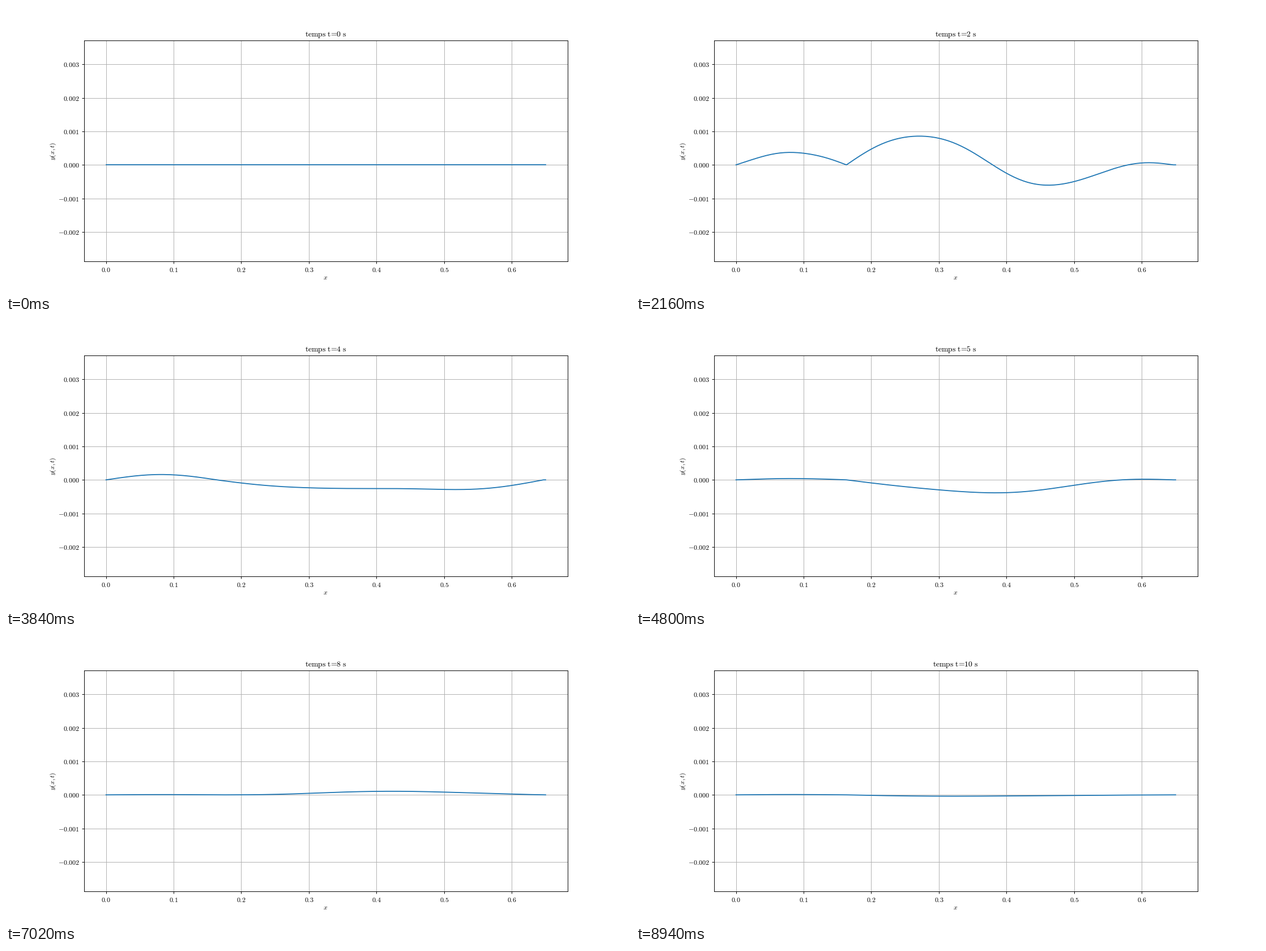
A matplotlib script that plays this animation: 1102x508 px, repeating every 9 s.

```python
import numpy as np
import matplotlib.pyplot as plt
from matplotlib.animation import FuncAnimation

W, H, DPI = 1102, 508, 64
PX = 72 / DPI  # points per pixel
FRAMES, INTERVAL = 150, 60
LENGTH, PLUCK_X, PLUCK_H = 0.65, 0.55, 0.00371
RELEASE, T0 = 15, 23  # letting go, and the moment mode amplitudes refer to

plt.rcParams.update({
    "mathtext.fontset": "cm",
    "font.size": 11.9 * PX,
    "axes.titlesize": 13.75 * PX,
    "axes.titlepad": 7.2 * PX,
    "axes.linewidth": 0.96 * PX,
    "grid.linewidth": 0.96 * PX,
    "grid.color": "#b0b0b0",
    "lines.linewidth": 1.8 * PX,
})
for axis in ("xtick", "ytick"):
    plt.rcParams.update({
        f"{axis}.major.size": 4.2 * PX,
        f"{axis}.major.pad": 4.2 * PX,
        f"{axis}.major.width": 0.96 * PX,
    })

x = np.linspace(0, LENGTH, 200)
NODE, END = 50, 198
left = x[:NODE + 1] / x[NODE]
right = (x[NODE:END + 1] - x[NODE]) / (x[END] - x[NODE])

# mode number, amplitude, phase in turns
RIGHT_MODES = [
    (1, -2.09e-3, -0.02),
    (2, -0.95e-3, -0.08),
    (3, 0.57e-3, 0.15),
    (4, -0.20e-3, 0.0),
    (5, -0.04e-3, 0.0),
    (6, -0.02e-3, 0.0),
    (7, 0.04e-3, 0.0),
]


def turn(v):
    return np.cos(2 * np.pi * v)


def mode(n, s):
    return np.sin(n * np.pi * s)


def pulled(k):
    """Triangle drawn up steadily until the release."""
    return PLUCK_H * k / RELEASE * np.interp(x, [0, PLUCK_X, LENGTH], [0, 1, 0])


def ringing(k):
    """Damped modes on both sides of the touched node."""
    d = k - T0
    y = np.zeros_like(x)
    for n, amp, phase in RIGHT_MODES:
        decay = np.exp(-(0.0325 + 0.0006 * (n * n - 1)) * d)
        y[NODE:END + 1] += amp * decay * turn(0.175 * n * d + phase) * mode(n, right)
    base = 0.66e-3 * np.exp(-0.033 * d) * turn(0.0705 * (k - 49))
    ripple = -0.02e-3 * np.exp(-0.06 * d) * turn(0.141 * d)
    y[:NODE + 1] += base * mode(1, left) + ripple * (mode(2, left) + mode(4, left))
    y[[0, NODE, END, -1]] = 0
    return y


def title(k):
    seconds = round(k / 15)
    return (r"$\mathrm{temps\ t}\hspace{-0.2}=\hspace{-0.2}"
            rf"\mathrm{{{seconds}\ s}}$")


fig = plt.figure(figsize=(W / DPI, H / DPI), dpi=DPI, facecolor="white")
ax = fig.add_axes([0.125, 0.11, 0.775, 0.77])
ax.set_xlim(-0.0325, 0.6825)
ax.set_ylim(-0.002882, 0.003714)
xt = np.arange(7) / 10
yt = np.arange(-2, 4) / 1000
ax.set_xticks(xt, [f"${v:.1f}$" for v in xt])
ax.set_yticks(yt, [f"${v:.3f}$" for v in yt])
ax.grid(True)
fig.text(564.5 / W, 1 - 481 / H, "$x$", ha="center", va="center")
fig.text(83 / W, 1 - 257 / H, "$y(x,t)$", ha="center", va="center", rotation=90)
string, = ax.plot(x, np.zeros_like(x), color="#1f77b4")
heading = ax.set_title(title(0))


def draw(k):
    string.set_ydata(pulled(k) if k < RELEASE else ringing(k))
    heading.set_text(title(k))
    return string, heading


anim = FuncAnimation(fig, draw, frames=FRAMES, interval=INTERVAL, repeat=True)
plt.show()
```
